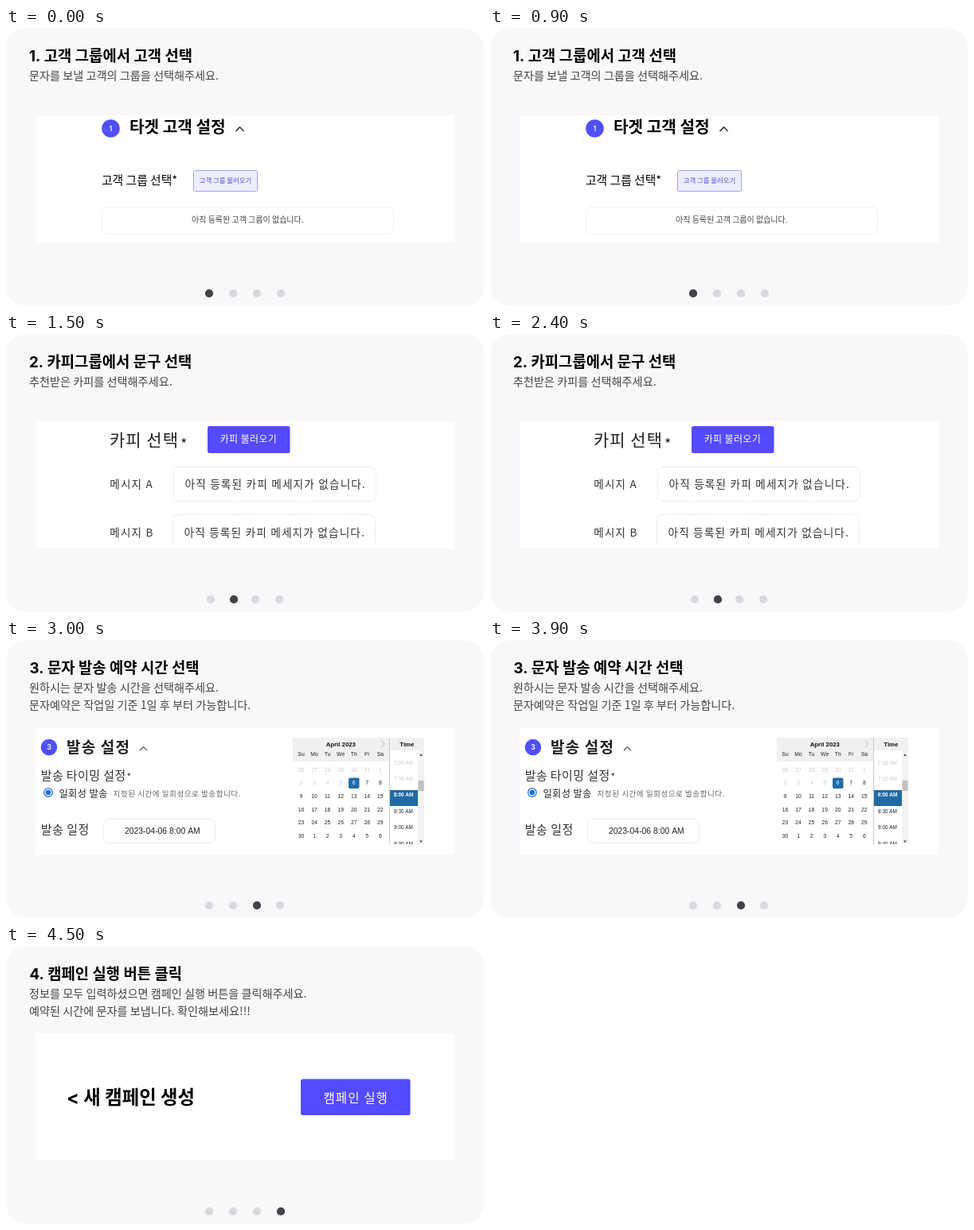
Recreate the animation shown at these times as an HTML page with a canvas. Size 600 by 350 pixels, loop 6000 ms.

```html
<!DOCTYPE html>
<html lang="ko">
<head>
<meta charset="utf-8">
<style>
  html, body { margin: 0; width: 100%; height: 100%; overflow: hidden; background: #fff; }
  canvas { display: block; }
</style>
</head>
<body>
<canvas id="stage" width="600" height="350"></canvas>
<script>
const ctx = document.getElementById('stage').getContext('2d');
const KR = '"Noto Sans CJK KR", "Noto Sans CJK", sans-serif';
const TITLE = 'Inter, ' + KR;
const ARIAL = '"Liberation Sans", Arial, sans-serif';
const VIOLET = '#544aff', BLUE = '#216ba5';
const STEP = 1500;

// y is the vertical middle of the glyphs
function text(s, x, y, size, { color = '#222', weight = 400, gap = 0, font = KR, align = 'left' } = {}) {
  ctx.font = `${weight} ${size}px ${font}`;
  ctx.letterSpacing = gap + 'px';
  ctx.textAlign = align;
  ctx.fillStyle = color;
  ctx.fillText(s, x, y + size * 0.37);
}

function box(x, y, w, h, r, fill, stroke, dash = []) {
  ctx.beginPath();
  ctx.roundRect(x, y, w, h, r);
  if (fill) { ctx.fillStyle = fill; ctx.fill(); }
  if (stroke) {
    ctx.strokeStyle = stroke;
    ctx.lineWidth = 1;
    ctx.setLineDash(dash);
    ctx.stroke();
    ctx.setLineDash([]);
  }
}

function disc(x, y, r, color) {
  ctx.beginPath();
  ctx.arc(x, y, r, 0, Math.PI * 2);
  ctx.fillStyle = color;
  ctx.fill();
}

function line(points, color, width) {
  ctx.beginPath();
  points.forEach(([x, y]) => ctx.lineTo(x, y));
  ctx.strokeStyle = color;
  ctx.lineWidth = width;
  ctx.stroke();
}

function triangle(x, y, h) {
  ctx.beginPath();
  ctx.moveTo(x - 2, y);
  ctx.lineTo(x + 2, y);
  ctx.lineTo(x, y + h);
  ctx.fillStyle = '#555';
  ctx.fill();
}

function clipped(x, y, w, h, draw) {
  ctx.save();
  ctx.beginPath();
  ctx.rect(x, y, w, h);
  ctx.clip();
  draw();
  ctx.restore();
}

function badge(n, x, y, r) {
  disc(x, y, r, '#5050f8');
  text(n, x, y, 9, { color: '#fff', weight: 600, align: 'center', font: TITLE });
}

function groupScene() {
  badge('1', 131.5, 126.5, 11.3);
  text('타겟 고객 설정', 155, 125, 20.2, { color: '#000', weight: 700 });
  line([[288.5, 130], [293.5, 124.8], [298.5, 130]], '#222', 1.3);
  text('고객 그룹 선택*', 120, 191.5, 14.8, { color: '#000', weight: 500 });
  box(235.5, 179.5, 80, 26, 2, '#ededfe', '#a3a2f6');
  text('고객 그룹 불러오기', 242.7, 192, 8.4, { color: '#554ff0' });
  box(120.5, 225.5, 366, 33.5, 6, null, '#f1f1f2');
  text('아직 등록된 고객 그룹이 없습니다.', 233, 241.5, 10, { color: '#444' });
}

function copyScene() {
  text('카피 선택', 130, 133.5, 21, { gap: 1 });
  text('*', 219, 138, 18);
  box(253, 116, 103.5, 34, 2.5, VIOLET);
  text('카피 불러오기', 268.7, 133, 12, { color: '#fff', weight: 500, gap: 0.35 });
  clipped(37, 110, 526, 156, () => {
    [['A', 210.5, 167.5, 189.3], ['B', 209.5, 227.5, 250]].forEach(([name, x, top, y]) => {
      text('메시지 ' + name, 130.3, y, 13.5, { color: '#333', gap: 1.2 });
      box(x, top, 254, 43, 8, null, '#e0e0e0', [2, 1.5]);
      text('아직 등록된 카피 메세지가 없습니다.', x + 14, y, 13.6, { color: '#333', gap: 1.2 });
    });
  });
}

function calendar() {
  const cell = { font: ARIAL, align: 'center' };
  box(360, 123, 121, 30, 0, '#f0f0f0');
  text('April 2023', 420.3, 130.7, 7.75, { ...cell, weight: 700, color: '#111' });
  line([[471, 126.5], [475, 130.8], [471, 135]], '#c4c4c4', 1.1);
  const colX = i => 370.5 + i * 16.55;
  ['Su', 'Mo', 'Tu', 'We', 'Th', 'Fr', 'Sa'].forEach((d, i) => text(d, colX(i), 143.5, 6.8, cell));
  box(430, 173.5, 13.5, 13.5, 2, BLUE);
  for (let i = 0; i < 42; i++) {
    const n = i - 5;
    const day = n < 1 ? n + 31 : n > 30 ? n - 30 : n;
    const color = n === 6 ? '#fff' : n < 6 ? '#cbcbcb' : '#222';
    text(day, colX(i % 7), 163.3 + Math.floor(i / 7) * 16.6, 6.8, { ...cell, color });
  }
  box(481, 123, 44, 16, 0, '#f0f0f0');
  text('Time', 503.3, 130.7, 7.75, { ...cell, weight: 700, color: '#111' });
  box(481, 189, 36, 20, 0, BLUE);
  ['7:00', '7:30', '8:00', '8:30', '9:00', '9:30'].forEach((t, i) => {
    const on = i === 2;
    const color = on ? '#fff' : i < 2 ? '#cbcbcb' : '#222';
    text(t + ' AM', 499, 154.3 + i * 20.4, 6.4, { ...cell, color, weight: on ? 700 : 400 });
  });
  box(517, 139, 8, 118, 0, '#f3f3f3');
  box(517.5, 177, 7, 13, 0, '#c1c1c1');
  triangle(521, 146, -3);
  triangle(521, 252.5, 3);
  line([[481.5, 123], [481.5, 257]], '#c9c9c9', 1);
}

function timeScene() {
  badge('3', 54, 135, 10.3);
  text('발송 설정', 76, 135, 19, { weight: 700, gap: 1.2 });
  line([[168, 139], [172.5, 134.5], [177, 139]], '#555', 1.2);
  text('발송 타이밍 설정', 43.7, 170, 15, { color: '#333', gap: 0.4 });
  text('*', 151.5, 172.8, 12, { color: '#333' });
  ctx.beginPath();
  ctx.arc(53, 192, 5.3, 0, Math.PI * 2);
  ctx.strokeStyle = '#1a6fe0';
  ctx.lineWidth = 1.2;
  ctx.stroke();
  disc(53, 192, 3.3, '#1a6fe0');
  text('일회성 발송', 66.5, 193, 12.2, { weight: 500, gap: 0.4 });
  text('지정된 시간에 일회성으로 발송합니다.', 134.5, 193, 9.6, { color: '#666', gap: 0.5 });
  text('발송 일정', 43.7, 238, 15, { color: '#333', gap: 0.5 });
  box(122.5, 225.5, 140, 30, 6, null, '#ededee');
  text('2023-04-06 8:00 AM', 149, 240.3, 10.4, { font: ARIAL });
  clipped(360, 123, 165, 134, calendar);
}

function runScene() {
  text('< 새 캠페인 생성', 76, 190.5, 23.3, { color: '#000', weight: 700, font: TITLE });
  box(370, 167.5, 137.5, 45.5, 2.5, VIOLET);
  text('캠페인 실행', 398.5, 190.8, 15.5, { color: '#fff', weight: 500, gap: 1.1 });
}

const slides = [
  { title: '1. 고객 그룹에서 고객 선택', x: 29, dots: [255, 285, 315, 345], draw: groupScene,
    notes: ['문자를 보낼 고객의 그룹을 선택해주세요.'] },
  { title: '2. 카피그룹에서 문구 선택', x: 29, dots: [257, 286, 313, 343], draw: copyScene,
    notes: ['추천받은 카피를 선택해주세요.'] },
  { title: '3. 문자 발송 예약 시간 선택', x: 29.5, dots: [255, 285, 315, 344], draw: timeScene,
    notes: ['원하시는 문자 발송 시간을 선택해주세요.', '문자예약은 작업일 기준 1일 후 부터 가능합니다.'] },
  { title: '4. 캠페인 실행 버튼 클릭', x: 29.5, dots: [255, 285, 315, 345], draw: runScene,
    notes: ['정보를 모두 입력하셨으면 캠페인 실행 버튼을 클릭해주세요.', '예약된 시간에 문자를 보냅니다. 확인해보세요!!!'] }
];

function render(now) {
  const index = Math.floor(now / STEP) % slides.length;
  const slide = slides[index];
  ctx.fillStyle = '#fff';
  ctx.fillRect(0, 0, 600, 350);
  box(0.5, 0.5, 599, 349, 24, '#f7f8fa');
  text(slide.title, slide.x, 35.2, 18.8, { color: '#000', weight: 700, font: TITLE });
  slide.notes.forEach((s, i) => text(s, 29, 60 + i * 22, 14.17, { color: '#444' }));
  box(37, 110, 526, 160, 0, '#fff');
  slide.draw();
  slide.dots.forEach((x, i) => disc(x, 334.2, 5.1, i === index ? '#424346' : '#d9dadd'));
}

const start = performance.now();
function loop() {
  render(performance.now() - start);
  requestAnimationFrame(loop);
}
loop();
</script>
</body>
</html>
```
